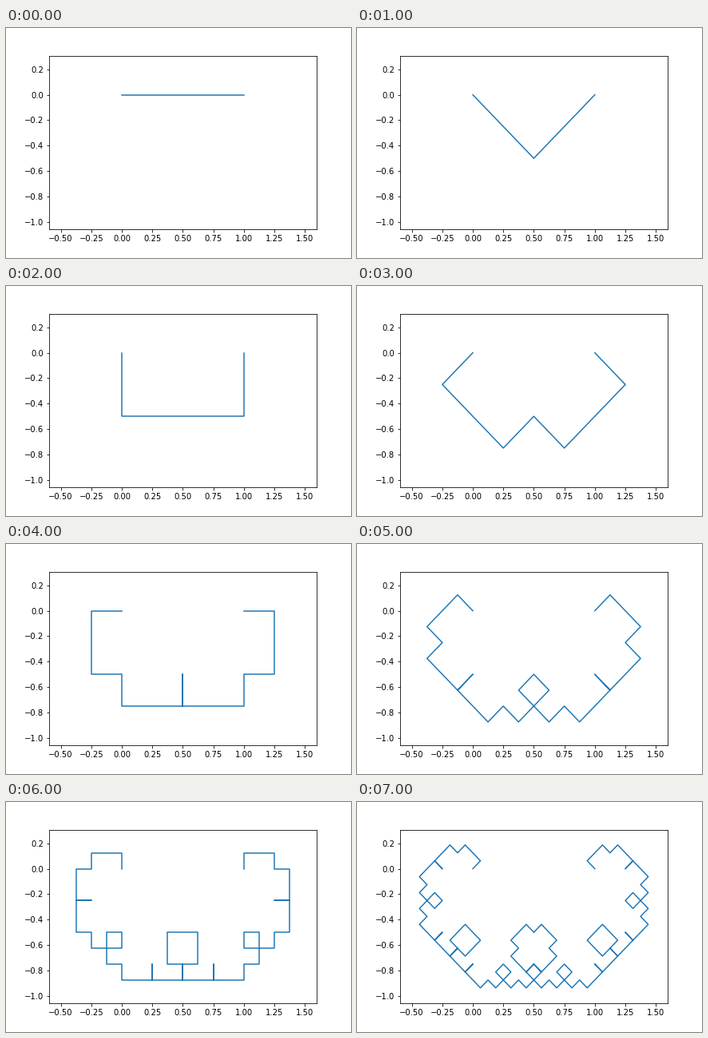
A matplotlib script for the animation above (8000 ms loop, 432 px wide and 288 px high).

```python
import matplotlib.pyplot as plt
import numpy as np
from matplotlib.animation import FuncAnimation
from matplotlib.ticker import MultipleLocator

LEVELS = 8
DEEPEST = 15  # the view is scaled to fit this depth of the curve


def levy_curve(depth):
    """Points of the Levy C curve from 0 to 1, as complex numbers."""
    pts = np.array([0, 1], dtype=complex)
    for _ in range(depth):
        a, b = pts[:-1], pts[1:]
        finer = np.empty(2 * len(pts) - 1, dtype=complex)
        finer[::2] = pts
        finer[1::2] = a + (b - a) * (1 - 1j) / 2
        pts = finer
    return pts


def padded(values, margin=0.05):
    low, high = values.min(), values.max()
    pad = margin * (high - low)
    return low - pad, high + pad


plt.rcParams.update({"font.family": "DejaVu Sans", "font.size": 10})
fig, ax = plt.subplots(figsize=(6, 4), dpi=72)
fig.subplots_adjust(left=0.125, right=0.9, bottom=0.125, top=0.88)

extent = levy_curve(DEEPEST)
ax.set_xlim(padded(extent.real))
ax.set_ylim(padded(extent.imag))
ax.xaxis.set_major_locator(MultipleLocator(0.25))
ax.yaxis.set_major_locator(MultipleLocator(0.2))

line, = ax.plot([], [], color="#1f77b4", lw=1.5)


def update(level):
    pts = levy_curve(level)
    line.set_data(pts.real, pts.imag)
    return line,


anim = FuncAnimation(fig, update, frames=LEVELS, interval=1000, repeat=True)
plt.show()
```
